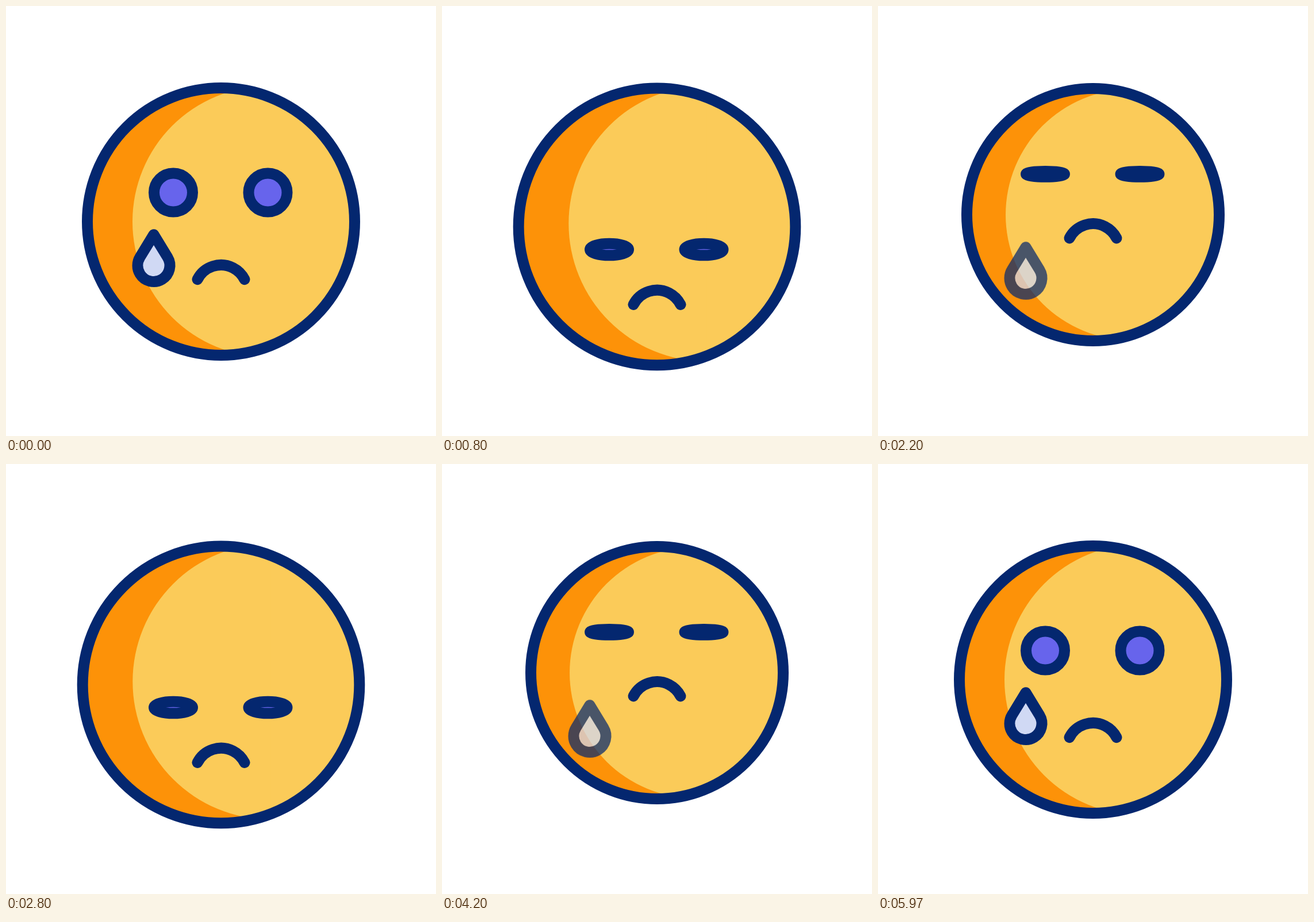
Recreate the animation shown at these times as an HTML page with a canvas. Size 748 px wide and 748 px high, loop 6 s.

```html
<!DOCTYPE html>
<html lang="en">
<head>
<meta charset="utf-8">
<title>Crying face</title>
<style>
  html, body { margin: 0; width: 100%; height: 100%; overflow: hidden; background: #fff; }
  canvas { display: block; width: 748px; height: 748px; }
</style>
</head>
<body>
<canvas id="stage" width="748" height="748"></canvas>
<script>
const ctx = document.getElementById('stage').getContext('2d');
const SIZE = 748, CYCLE = 2000, LINE = 19, CX = 374;
const NAVY = '#04276f', YELLOW = '#fbcb59', ORANGE = '#fd9208';
const VIOLET = '#6764ec', PALE = '#d0d9f4';

// Tracks are [time, value] pairs, eased in and out between keys.
const nod = (rest, up, down) => [[0, rest], [320, up], [920, down], [1280, rest]];
const tracks = {
  radius: nod(242, 223, 253.5),
  faceY: nod(375, 357.5, 387),
  lightR: nod(235.4, 210.5, 243.4),
  lightY: nod(375, 357.5, 380.8),
  lightX: nod(220, 223, 220),
  eyeY: nod(324.5, 277.5, 440.5),
  mouthY: nod(0, -105, 61),
  eyeOpen: [[0, 1], [264, 0], [600, 0], [920, 0.45], [1280, 1]],
  tearAlpha: [[0, 1], [130, 1], [330, 0], [1320, 0], [1600, 1]],
  tearY: [[0, 0], [320, 32], [1280, 32], [1280, -32], [1880, 0]]
};

function valueAt(keys, t) {
  let i = keys.length - 1;
  while (keys[i][0] > t) i--;
  if (i === keys.length - 1) return keys[i][1];
  const [t0, a] = keys[i], [t1, b] = keys[i + 1];
  const u = (t - t0) / (t1 - t0);
  return a + (b - a) * u * u * (3 - 2 * u);
}

function disc(c, x, y, r, color) {
  c.beginPath();
  c.arc(x, y, r, 0, Math.PI * 2);
  c.fillStyle = color;
  c.fill();
}

function outline(c) {
  c.strokeStyle = NAVY;
  c.lineWidth = LINE;
  c.lineCap = c.lineJoin = 'round';
  c.stroke();
}

// The drop lives on its own layer so it fades as one piece.
function makeTear() {
  const layer = document.createElement('canvas');
  layer.width = layer.height = SIZE;
  const c = layer.getContext('2d');
  const x = 257, y = 451.5, r = 28, tip = 397.7;
  const spread = Math.acos(r / (y - tip));
  c.beginPath();
  c.moveTo(x, tip);
  c.arc(x, y, r, spread - Math.PI / 2, Math.PI * 1.5 - spread);
  c.closePath();
  c.fillStyle = PALE;
  c.fill();
  outline(c);
  return layer;
}
const tear = makeTear();

function drawFace(p) {
  ctx.save();
  ctx.beginPath();
  ctx.arc(CX, p.faceY, p.radius - LINE / 2, 0, Math.PI * 2);
  ctx.clip();
  ctx.fillStyle = ORANGE;
  ctx.fillRect(0, 0, SIZE, SIZE);
  disc(ctx, p.lightX + p.lightR, p.lightY, p.lightR, YELLOW);
  // Right of the light's middle the face is always bright.
  ctx.fillStyle = YELLOW;
  ctx.fillRect(p.lightX + p.lightR, 0, SIZE, SIZE);
  ctx.restore();
  ctx.beginPath();
  ctx.arc(CX, p.faceY, p.radius - LINE / 2, 0, Math.PI * 2);
  outline(ctx);
}

function drawEye(x, y, open) {
  ctx.beginPath();
  ctx.ellipse(x, y, 33.5, Math.max(0.5, 33.5 * open), 0, 0, Math.PI * 2);
  ctx.fillStyle = VIOLET;
  ctx.fill();
  outline(ctx);
}

function drawMouth(dy) {
  const r = 46, half = Math.asin(41 / r);
  ctx.beginPath();
  ctx.arc(CX, 496.5 + dy, r, -Math.PI / 2 - half, -Math.PI / 2 + half);
  outline(ctx);
}

function draw(t) {
  const p = {};
  for (const name in tracks) p[name] = valueAt(tracks[name], t);
  ctx.fillStyle = '#fff';
  ctx.fillRect(0, 0, SIZE, SIZE);
  drawFace(p);
  drawEye(291, p.eyeY, p.eyeOpen);
  drawEye(455.5, p.eyeY, p.eyeOpen);
  drawMouth(p.mouthY);
  ctx.globalAlpha = p.tearAlpha;
  ctx.drawImage(tear, 0, p.tearY);
  ctx.globalAlpha = 1;
}

// Five 40 ms poses spread over six ticks; the first is held for two.
function stepped(t) {
  const block = Math.floor(t / 200) * 200;
  const tick = Math.floor((t - block + 3.4) / (200 / 6));
  return block + Math.min(4, Math.max(0, tick - 1)) * 40;
}

const start = performance.now();
function loop(now) {
  draw(stepped(Math.max(0, now - start) % CYCLE));
  requestAnimationFrame(loop);
}
draw(0);
requestAnimationFrame(loop);
</script>
</body>
</html>
```
